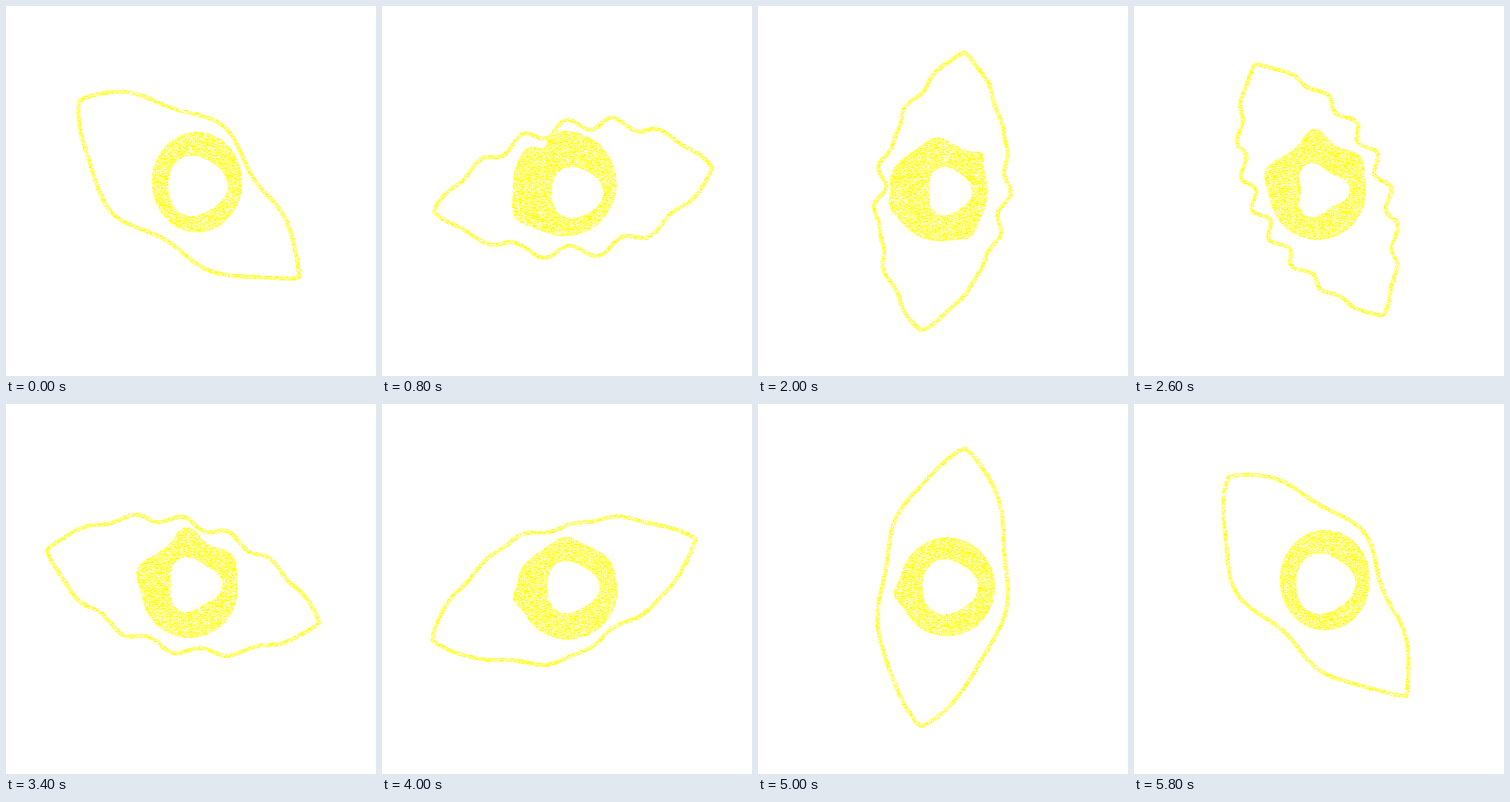
These frames come from a looping animation (500 px wide and 500 px high, 6 s). An HTML page with a canvas:

```html
<!DOCTYPE html>
<html lang="en">
<head>
<meta charset="utf-8">
<title>Turning eye</title>
<style>
  html, body { margin: 0; width: 100%; height: 100%; overflow: hidden; background: #fff; }
  canvas { display: block; width: 100vw; height: 100vh; }
</style>
</head>
<body>
<canvas id="stage" width="500" height="500"></canvas>
<script>
const SIZE = 500, STEPS = 30, STEP_MS = 200, POINTS = 480;
const TAU = Math.PI * 2, FIRST_TILT = 39 / 360 * TAU, HALF_LENGTH = 190, HALF_HEIGHT = 85;
const ctx = document.getElementById('stage').getContext('2d');

// Almond lying along the x axis: fuller at one end by `lean`, each lid rippled.
function lid({ lean, shift = 0, upper, lower }) {
  return a => {
    const along = Math.cos(a), side = Math.sin(a), x = HALF_LENGTH * along + shift;
    const { amp, crest, wave } = side < 0 ? upper : lower;
    const lens = HALF_HEIGHT * Math.abs(side) ** 1.6 * (1 + lean * along);
    const ripple = amp * side ** 2 * Math.cos((x - crest) / wave * TAU);
    return [x, Math.sign(side) * (lens + ripple)];
  };
}

const ripple = (amp, crest, wave) => ({ amp, crest, wave });
const bump = (at, height, width) => ({ at, height, width });

// Ellipse with a three-cornered pull towards the right and optional bumps.
function blob(cx, cy, rx, ry, { point = 0, bumps = [] } = {}) {
  return a => {
    const pull = 1 + point * Math.cos(3 * a);
    const swell = bumps.reduce((sum, b) => {
      const off = Math.atan2(Math.sin(a - b.at), Math.cos(a - b.at));
      return sum + b.height * Math.exp(-((off / b.width) ** 2));
    }, 0);
    return [cx + (rx * pull + swell) * Math.cos(a), cy + (ry * pull + swell) * Math.sin(a)];
  };
}

const knobbed = blob(248, 251, 65, 65, {
  bumps: [bump(-1.62, 20, 0.26), bump(-0.68, 10, 0.3), bump(-2.75, 11, 0.3)]
});

const calm = {
  step: 0,
  lid: lid({ lean: -0.2, shift: -3, upper: ripple(9, -20, 160), lower: ripple(9, -70, 170) }),
  iris: blob(258, 238, 61, 68),
  pupil: blob(257, 243, 40, 40, { point: 0.06 })
};

const poses = [
  calm,
  {
    step: 4,
    lid: lid({ lean: 0.12, shift: 8, upper: ripple(9, 14, 62), lower: ripple(9, 28, 74) }),
    iris: blob(247, 240, 70, 71, { bumps: [bump(2.55, 11, 0.3), bump(-2.1, -15, 0.18)] }),
    pupil: blob(262, 252, 35, 34, { point: 0.06 })
  },
  {
    step: 8,
    lid: lid({ lean: -0.05, shift: -3, upper: ripple(9, 24, 70), lower: ripple(6, 80, 68) }),
    iris: blob(243, 252, 65, 67, { bumps: [bump(-0.72, 15, 0.14), bump(0.95, 13, 0.25), bump(2.87, 8, 0.2)] }),
    pupil: blob(261, 251, 26, 31)
  },
  {
    step: 13,
    lid: lid({ lean: 0.06, upper: ripple(8, 63, 46), lower: ripple(8, -41, 50) }),
    iris: knobbed,
    pupil: blob(252, 249, 33, 33, { point: 0.2 })
  },
  {
    step: 17,
    lid: lid({ lean: 0.05, shift: 11, upper: ripple(6, -72, 73), lower: ripple(6, -30, 65) }),
    iris: knobbed,
    pupil: blob(253, 244, 35, 35, { point: 0.13 })
  },
  {
    step: 22,
    lid: lid({ lean: 0.1, upper: ripple(10, 40, 170), lower: ripple(7, 45, 150) }),
    iris: blob(254, 254, 67, 66, { bumps: [bump(3, 15, 0.2)] }),
    pupil: blob(258, 250, 35, 34, { point: 0.05 })
  },
  { ...calm, step: 29 },
  { ...calm, step: STEPS }
];

function random(seed) {
  return () => {
    seed = seed + 0x6D2B79F5 | 0;
    let t = Math.imul(seed ^ seed >>> 15, 1 | seed);
    t = t + Math.imul(t ^ t >>> 7, 61 | t) ^ t;
    return ((t ^ t >>> 14) >>> 0) / 4294967296;
  };
}

// Fine yellow stipple: a loosened checkerboard of single pixels.
function makeGrain(size) {
  const tile = document.createElement('canvas');
  tile.width = tile.height = size;
  const pen = tile.getContext('2d'), rnd = random(11);
  pen.fillStyle = '#ff0';
  for (let y = 0; y < size; y++) {
    for (let x = 0; x < size; x++) {
      if (rnd() < ((x + y) % 2 ? 0.85 : 0.25)) pen.fillRect(x, y, 1, 1);
    }
  }
  return ctx.createPattern(tile, 'repeat');
}
const grain = makeGrain(256);

// Adds the closed curve that lies between two poses.
function trace(path, from, to, mix) {
  for (let i = 0; i < POINTS; i++) {
    const a = i / POINTS * TAU, [x0, y0] = from(a), [x1, y1] = to(a);
    path[i ? 'lineTo' : 'moveTo'](x0 + (x1 - x0) * mix, y0 + (y1 - y0) * mix);
  }
  path.closePath();
}

function draw(step) {
  const next = poses.findIndex(p => p.step > step);
  const from = poses[next - 1], to = poses[next];
  const mix = (step - from.step) / (to.step - from.step);
  const outline = new Path2D(), ring = new Path2D();
  trace(outline, from.lid, to.lid, mix);
  trace(ring, from.iris, to.iris, mix);
  trace(ring, from.pupil, to.pupil, mix);

  ctx.globalCompositeOperation = 'source-over';
  ctx.clearRect(0, 0, SIZE, SIZE);
  ctx.fill(ring, 'evenodd');
  ctx.save();
  ctx.translate(250, 249);
  ctx.rotate(FIRST_TILT - step / STEPS * TAU);
  ctx.lineWidth = 5.5;
  ctx.lineJoin = 'round';
  ctx.stroke(outline);
  ctx.restore();

  // Keep the stipple only where something was drawn, shifted anew each step.
  const rnd = random(step * 97 + 5);
  const dx = Math.floor(rnd() * 256), dy = Math.floor(rnd() * 256);
  ctx.globalCompositeOperation = 'source-in';
  ctx.save();
  ctx.translate(-dx, -dy);
  ctx.fillStyle = grain;
  ctx.fillRect(dx, dy, SIZE, SIZE);
  ctx.restore();
}

const start = performance.now();
let shown = -1;
function tick() {
  const step = Math.floor((performance.now() - start) / STEP_MS) % STEPS;
  if (step !== shown) draw(shown = step);
  requestAnimationFrame(tick);
}
tick();
</script>
</body>
</html>
```
